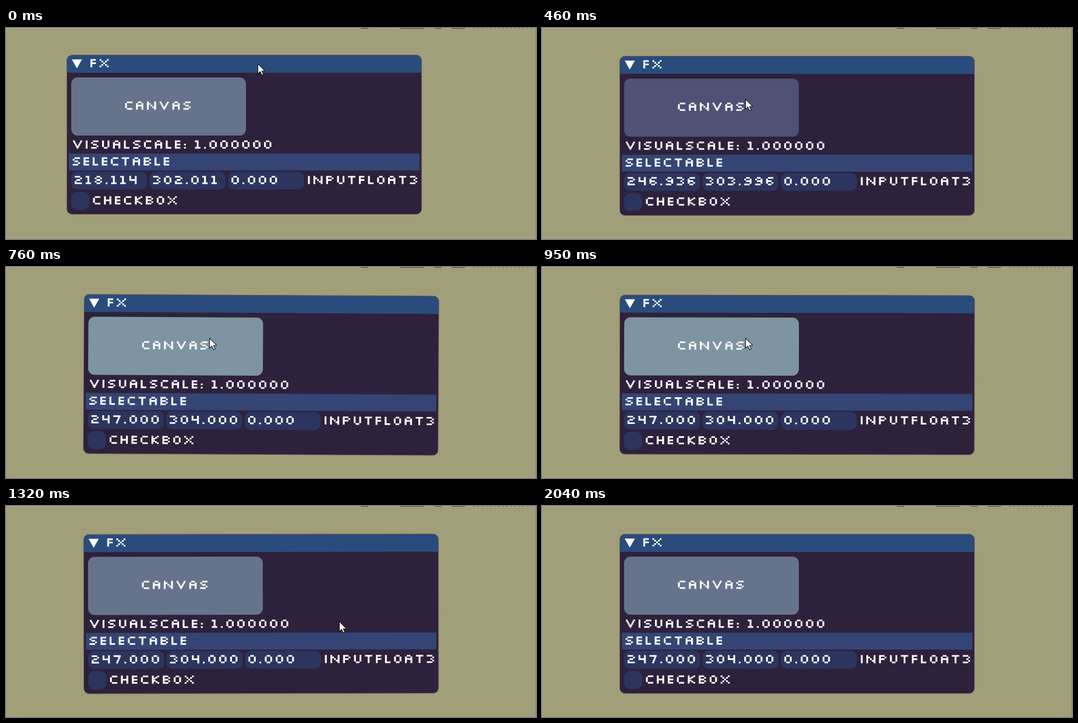
Recreate the animation shown at these times as an HTML page with a canvas. Size 910 by 363 pixels, loop 2.79 s.

```html
<!DOCTYPE html>
<html lang="en">
<head>
<meta charset="utf-8">
<title>FX panel</title>
<style>
html, body { margin: 0; width: 100%; height: 100%; overflow: hidden; background: #a19e7a; }
canvas { display: block; }
</style>
</head>
<body>
<canvas id="stage" width="910" height="363" role="img"
  aria-label="FX panel: Canvas, VisualScale 1.000000, Selectable, InputFloat3, Checkbox"></canvas>
<script>
const ctx = document.getElementById('stage').getContext('2d');
const LOOP = 2790;
const UX = 3.125, UY = 2.8;

// Block lettering: strokes run between nine nodes laid out like the keys
// qwe / asd / zxc. A capital node is a turn whose corner block is left out.
const NODES = 'qweasdzxc';
const GLYPHS = {
  A: 'zQEc ad', B: 'qEDCzq aD', C: 'eQZc', E: 'eqzc ad', F: 'eqz ad', H: 'qz ec ad',
  I: 'qz', K: 'qz eac', L: 'qzc', N: 'zqce', O: 'QECZQ', P: 'zqEDa', S: 'eQADCz',
  T: 'qe wx', U: 'qZCe', V: 'qxe', X: 'qc ez', 0: 'QECZQ', 1: 'qwx zc', 2: 'qEDAzc',
  3: 'qEDs DCz', 4: 'qad ec', 5: 'eqaDCz', 6: 'eQZCDa', 7: 'qex', 8: 'QEDAQ AZCD',
  9: 'dAQECz', '.': 'z', ':': 'a z', ' ': ''
};

function columns(ch) {
  if ('NVX'.includes(ch)) return 5;
  if ('EFL1'.includes(ch)) return 3;
  return 'I.: '.includes(ch) ? 1 : 4;
}

function blocks(ch) {
  const cells = new Map();
  const half = (columns(ch) - 1) / 2;
  const place = key => {
    const i = NODES.indexOf(key.toLowerCase());
    return { x: i % 3 * half, y: Math.floor(i / 3) * 2, cut: key !== key.toLowerCase() };
  };
  for (const stroke of GLYPHS[ch].split(' ')) {
    const pts = [...stroke].map(place);
    pts.forEach((b, i) => {
      const a = pts[Math.max(0, i - 1)];
      const n = Math.max(Math.abs(b.x - a.x), Math.abs(b.y - a.y), 1);
      for (let k = a.cut ? 1 : 0; k <= n; k++) {
        if (b.cut && (k === n || a === b)) continue;
        const x = a.x + (b.x - a.x) * k / n, y = a.y + (b.y - a.y) * k / n;
        cells.set(x + ',' + y, [x, y]);
      }
    });
  }
  return [...cells.values()];
}

function text(str, x, y) {
  ctx.fillStyle = '#fff';
  ctx.beginPath();
  for (const ch of str) {
    for (const [cx, cy] of blocks(ch)) ctx.rect(x + cx * UX, y + cy * UY, UX, UY);
    x += (columns(ch) + 2) * UX;
  }
  ctx.fill();
}

function box(x, y, w, h, r, color) {
  ctx.fillStyle = color;
  ctx.beginPath();
  ctx.roundRect(x, y, w, h, r);
  ctx.fill();
}

function poly(pts, color) {
  ctx.fillStyle = color;
  ctx.beginPath();
  pts.forEach(([x, y]) => ctx.lineTo(x, y));
  ctx.closePath();
  ctx.fill();
}

const ease = p => p * p * p * (10 - 15 * p + 6 * p * p);
const DRAG = { x: 29, y: 2, from: 70, to: 100 };

// How much of the drag is done, and how much the trailing values still lack
const dragged = t => ease(Math.min(1, Math.max(0, (t - DRAG.from) / (DRAG.to - DRAG.from))));
const missing = t => Math.exp(-16.4 * Math.max(0, t - 87.4) / 1000);

// Pointer stops: time, x, y
const STOPS = [
  [250, 461, 63], [440, 349, 122], [1100, 349, 122],
  [1570, 855, 295], [1900, 877, 365], [LOOP, 877, 365]
];

function pointer(t) {
  const i = STOPS.findIndex(s => t <= s[0]);
  if (i === 0) {
    const rest = 1 - dragged(t);
    return [461 - DRAG.x * rest, 63 - DRAG.y * rest];
  }
  const [t0, x0, y0] = STOPS[i - 1], [t1, x1, y1] = STOPS[i];
  const e = ease((t - t0) / (t1 - t0));
  return [x0 + (x1 - x0) * e, y0 + (y1 - y0) * e];
}

function swing(t, start, power) {
  const s = Math.max(0, t - start) / 1000;
  return power * Math.exp(-9 * s) * Math.sin(28 * s);
}

// The panel leans while its values trail the drag, and wobbles on a press.
function tilt(t) {
  const lag = dragged(t) + missing(t) - 1;
  return -0.054 * lag + swing(t, 666, 0.0256) + swing(t, 1067, -0.0185);
}

function buttonColor(t, x, y) {
  if (t > 680 && t < 1190) return '#7d94a1';
  const over = x > 141 && x < 441 && y > 87 && y < 187;
  return over ? '#4f5175' : '#66748b';
}

function backdrop() {
  ctx.fillStyle = '#a19e7a';
  ctx.fillRect(0, 0, 910, 363);
  ctx.fillStyle = '#aaa9a0';
  ctx.fillRect(0, 0, 910, 1);
  ctx.fillStyle = '#85836f';
  ctx.fillRect(909, 0, 1, 363);
  ctx.fillStyle = '#3c3c3a';
  for (const [x, w] of [[609, 13], [677, 41], [736, 12], [765, 23]]) ctx.fillRect(x, 0, w, 1);
  ctx.fillStyle = '#77766c';
  for (let x = 802; x < 902; x += 7) ctx.fillRect(x, 0, 4, 1);
}

function panel(t, x, y) {
  const m = missing(t);
  const values = [247 - 28.886 * m, 304 - 1.989 * m ** 1.016, 0];

  box(133.5, 48.5, 609, 274, 9, '#2e213b');
  box(133.5, 48.5, 609, 30.5, [9, 9, 0, 0], '#294c7c');
  ctx.strokeStyle = 'rgba(125, 85, 75, 0.75)';
  ctx.lineWidth = 1;
  ctx.beginPath();
  ctx.roundRect(133.5, 48.5, 609, 274, 9);
  ctx.stroke();

  poly([[142, 56], [159.5, 56], [150.7, 71.5]], '#fff');
  text('FX', 174, 55.5);

  box(141, 87, 300, 100, 11, buttonColor(t, x, y));
  text('CANVAS', 233.5, 128.5);
  text('VISUALSCALE: 1.000000', 144, 195.5);

  box(137, 218, 602, 29, 0, '#344575');
  text('SELECTABLE', 143.5, 224.5);

  values.forEach((v, i) => {
    const left = 141 + i * 134.6;
    box(left, 249, 130.5, 31, 10, '#2b355e');
    text(v.toFixed(3), left + 6, 256.5);
  });
  text('INPUTFLOAT3', 547.5, 256.5);

  box(141, 284, 31, 31, 10, '#2b355e');
  text('CHECKBOX', 178.5, 291.5);
}

function arrow(x, y) {
  ctx.save();
  ctx.translate(x, y);
  ctx.scale(1.08, 1.08);
  poly([[0.5, 0.5], [0.5, 16.5], [4.2, 13], [6.7, 18.6], [9.2, 17.5], [6.8, 12], [11.5, 11.8]], '#fff');
  ctx.strokeStyle = '#111';
  ctx.lineWidth = 1;
  ctx.stroke();
  ctx.restore();
}

function draw(t) {
  const [x, y] = pointer(t);
  const rest = 1 - dragged(t);
  backdrop();
  ctx.save();
  ctx.translate(438 - DRAG.x * rest, 185.5 - DRAG.y * rest);
  ctx.rotate(tilt(t));
  ctx.translate(-438, -185.5);
  panel(t, x, y);
  ctx.restore();
  arrow(x, y);
}

const start = performance.now();
function tick(now) {
  const t = Math.max(0, now - start) % LOOP;
  draw(Math.floor(t / 10) * 10);
  requestAnimationFrame(tick);
}
draw(0);
requestAnimationFrame(tick);
</script>
</body>
</html>
```
